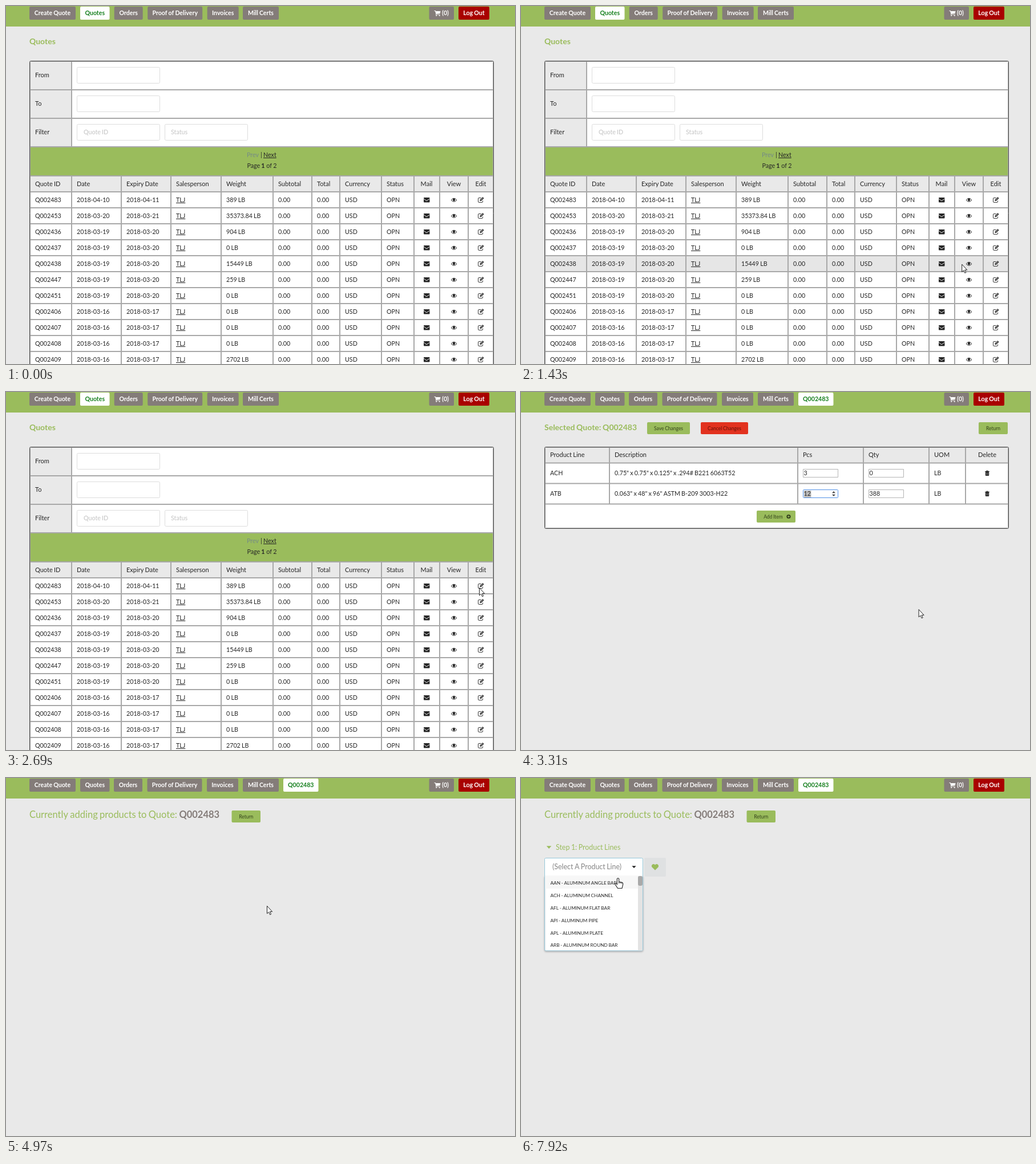
Recreate the animation shown at these times as an HTML page with a canvas. Size 892 px wide and 628 px high, loop 8 s.

```html
<!DOCTYPE html>
<html lang="en">
<head>
<meta charset="utf-8">
<title>Quotes</title>
<style>
  html, body { margin: 0; width: 100%; height: 100%; overflow: hidden; background: #e9e9e9; }
  canvas { display: block; }
</style>
</head>
<body>
<canvas id="stage" width="892" height="628"></canvas>
<script>
const ctx = document.getElementById('stage').getContext('2d');
const LOOP = 8000;
const INK = '#262626', GREEN = '#9abc5c', PALE = '#e9e9e9', GRAY = '#847c79', LINE = '#a8a8a8', HOVER = '#e6e6e6';

// Times at which the pages change
const PRESS_EDIT = 2510, EDIT_PAGE = 2810, PRESS_ADD = 4850, ADD_PAGE = 4970, STEP_SHOWN = 5030,
      MENU_OPEN = 7270, TO_MENU = 7720;

// Pointer path: time, x, y
const path = [
  [1110, 689, 616], [1250, 689, 616], [1340, 728, 543], [1430, 772, 453], [1600, 808, 388],
  [1800, 825, 353], [2040, 830, 345], [2270, 829, 343], [2810, 829, 343], [3000, 795, 354],
  [3310, 697, 381], [3370, 671, 380], [3600, 573, 331], [3850, 490, 262], [4160, 460, 227],
  [4330, 457, 224], [5550, 457, 224], [5700, 395, 224], [5900, 275, 216], [6100, 207, 192],
  [6310, 178.5, 165], [7720, 178.5, 165], [7920, 170, 176]
];

const quotes = [
  '483 04-10 04-11 389', '453 03-20 03-21 35373.84', '436 03-19 03-20 904', '437 03-19 03-20 0',
  '438 03-19 03-20 15449', '447 03-19 03-20 259', '451 03-19 03-20 0', '406 03-16 03-17 0',
  '407 03-16 03-17 0', '408 03-16 03-17 0', '409 03-16 03-17 2702'
].map(row => row.split(' '));
const quoteColumns = [42, 115, 202, 289, 377, 468, 536, 585, 658, 715, 760, 810];
const quoteHeads = ['Quote ID', 'Date', 'Expiry Date', 'Salesperson', 'Weight', 'Subtotal', 'Total',
                    'Currency', 'Status'];
const itemColumns = [42, 155, 485, 600, 715, 779];
const products = ['AAN - ALUMINUM ANGLE BAR', 'ACH - ALUMINUM CHANNEL', 'AFL - ALUMINUM FLAT BAR',
                  'API - ALUMINUM PIPE', 'APL - ALUMINUM PLATE', 'ARB - ALUMINUM ROUND BAR'];

function rect(x, y, w, h, fill) {
  ctx.fillStyle = fill;
  ctx.fillRect(x, y, w, h);
}

function box(x, y, w, h, radius, fill, stroke) {
  ctx.beginPath();
  ctx.roundRect(x, y, w, h, radius);
  if (fill) { ctx.fillStyle = fill; ctx.fill(); }
  if (stroke) { ctx.strokeStyle = stroke; ctx.lineWidth = 1; ctx.stroke(); }
}

// Draws text centred vertically on y and returns its right end
function text(s, x, y, { size = 10.7, color = INK, weight = 400, center = false, underline = false } = {}) {
  ctx.font = `${weight} ${size}px Lato, sans-serif`;
  ctx.wordSpacing = `${-0.05 * size}px`;
  const width = ctx.measureText(s).width;
  if (center) x -= width / 2;
  ctx.fillStyle = color;
  ctx.fillText(s, x, Math.round(y + size * 0.36));
  if (underline) rect(x, Math.round(y) + 5, width, 1, color);
  return x + width;
}

function shape(d, x, y, fill, stroke, width = 1) {
  const p = new Path2D(d);
  ctx.save();
  ctx.translate(x, y);
  if (fill) { ctx.fillStyle = fill; ctx.fill(p); }
  if (stroke) { ctx.strokeStyle = stroke; ctx.lineWidth = width; ctx.stroke(p); }
  ctx.restore();
}

const icons = {
  mail(x, y) {
    box(x - 5, y - 4, 10.5, 8.5, 1, INK);
    shape('M-5-1.8L0 1.8L5.5-1.8', x, y, null, '#fff', 0.9);
  },
  eye(x, y) {
    shape('M-5 .5Q0-6 5 .5Q0 6-5 .5Z', x, y, null, INK);
    shape('M-2.2 0a2.2 2.2 0 1 0 4.4 0a2.2 2.2 0 1 0-4.4 0', x, y, INK);
  },
  edit(x, y) {
    shape('M.5-3.5H-3Q-4.5-3.5-4.5-2V3Q-4.5 4.5-3 4.5H2Q3.5 4.5 3.5 3V1.5', x, y, null, INK, 0.9);
    shape('M-1.5 2V-.2L3.4-5L5.6-2.8L.7 2Z', x, y, INK);
    shape('M-.4 .6L3.8-3.4', x, y, null, '#fff', 0.8);
  },
  trash(x, y) {
    shape('M-4-3H4M-1.5-3V-4.3H1.5V-3', x, y, null, INK);
    box(x - 3.2, y - 2.5, 6.4, 7, 1, INK);
    shape('M-1.3-1V3M1.3-1V3', x, y, null, '#bbb', 0.7);
  },
  cart(x, y) {
    shape('M-5.5-4.5H-3.2L-2.8-3.4H5.5L4.7.7L-2 1.5V2.2H4.5V3.1H-3L-2.7 1.2L-3.9-3.5H-5.5Z', x, y, '#fff');
    shape('M-2.8 4.2a1 1 0 1 0 2 0a1 1 0 1 0-2 0M2.7 4.2a1 1 0 1 0 2 0a1 1 0 1 0-2 0', x, y, '#fff');
  },
  plus(x, y) {
    shape('M-3.6 0a3.6 3.6 0 1 0 7.2 0a3.6 3.6 0 1 0-7.2 0', x, y, '#33401c');
    shape('M-2 0H2M0-2V2', x, y, null, GREEN, 1.1);
  }
};

function smallButton(label, x, y, w, { fill = GREEN, color = '#35431c', shift = 0 } = {}) {
  box(x, y, w, 21, 2, fill);
  text(label, x + w / 2 + shift, y + 11, { size: 8.5, color, center: true });
}

function navigation(onList) {
  rect(0, 0, 892, 36, GREEN);
  const tabs = [['Create Quote', 41, 81], ['Quotes', 130, 51.5], ['Orders', 189, 50],
                ['Proof of Delivery', 247.5, 96], ['Invoices', 352, 55], ['Mill Certs', 415, 63]];
  if (!onList) tabs.push(['Q002483', 486, 61.5]);
  const active = onList ? 1 : 6;
  tabs.forEach(([label, x, w], i) => {
    if (onList && i > 1 && i < 5) x += 0.7;
    box(x, 1, w, 23, 2, i === active ? '#fff' : GRAY);
    text(label, x + w / 2, 12.5, { size: 10.6, weight: 700, center: true, color: i === active ? '#17801f' : '#fff' });
  });
  box(741.5, 1, 43.5, 23, 2, GRAY);
  icons.cart(756, 12.5);
  text('(0)', 764, 12.5, { size: 10.6, weight: 700, color: '#fff' });
  box(793, 1, 54, 23, 2, '#a90000');
  text('Log Out', 820, 12.5, { size: 10.6, weight: 700, color: '#fff', center: true });
}

function tableFrame(height) {
  box(42.5, 97.5, 811, height - 3, 1, null, LINE);
  box(41.5, 96.5, 813, height - 1, 2, null, '#4c4c4c');
}

const rowLine = y => rect(43, y - 1, 811, 2, LINE);
const columnLines = (columns, top, bottom) =>
  columns.slice(1).forEach(x => rect(x - 1, top, 2, bottom - top, LINE));

function listPage(time, pointer) {
  text('Quotes', 41, 61.5, { size: 14, weight: 700, color: GREEN });
  rect(42, 97, 812, 531, '#fff');
  rect(42, 97, 73, 150, PALE);
  ['From', 'To', 'Filter'].forEach((label, i) => {
    const y = 121.5 + i * 50;
    text(label, 51, y, { size: 11 });
    box(124.5, y - 14, 145, 28, 2, '#fff', '#dcdcdc');
    rowLine(147 + i * 50);
  });
  box(278.5, 207.5, 145, 28, 2, '#fff', '#dcdcdc');
  text('Quote ID', 136, 221.5, { color: '#c3c3c3' });
  text('Status', 289, 221.5, { color: '#c3c3c3' });
  rect(114, 97, 2, 150, LINE);

  rect(43, 248, 811, 49, GREEN);
  text('Prev', 422, 261, { color: '#758a86' });
  text('|', 446, 261);
  text('Next', 451, 261, { underline: true });
  const x = text('Page ', 422.5, 280);
  text(' of 2', text('1', x, 280, { weight: 700 }), 280);

  rect(43, 298, 811, 28, PALE);
  quoteHeads.forEach((label, i) => text(label, quoteColumns[i] + 9, 312, { size: 11 }));
  text('Mail', 737, 312, { size: 11, center: true });
  text('View', 785, 312, { size: 11, center: true });
  text('Edit', 832, 312, { size: 11, center: true });

  const hovered = time >= 1250 && time < PRESS_EDIT ? Math.floor((pointer.y - 326) / 28) : -1;
  quotes.forEach(([id, date, expiry, weight], i) => {
    const y = 340 + i * 28;
    if (i === hovered) rect(43, y - 13, 811, 26, HOVER);
    const cells = ['Q002' + id, '2018-' + date, '2018-' + expiry, 'TLJ', weight + ' LB', '0.00', '0.00', 'USD', 'OPN'];
    cells.forEach((cell, c) => text(cell, quoteColumns[c] + 9, y, { underline: c === 3 }));
    icons.mail(737, y);
    icons.eye(785, y);
    icons.edit(832, y);
    rowLine(y - 14);
  });
  rowLine(298);
  columnLines(quoteColumns, 298, 628);
  tableFrame(560);
}

function numberInput(x, y, value, focused) {
  box(x + 0.5, y - 7.5, 61, 14, focused ? 1 : 0, '#fff', focused ? '#4f8fe6' : '#b4b4b4');
  if (focused) {
    rect(x + 2, y - 6, 12.5, 12, '#bdbdbd');
    shape('M-3-1.2L0-4.4L3-1.2ZM-3 1.2L0 4.4L3 1.2Z', x + 54, y - 0.5, '#444');
  }
  text(value, x + 1.5, y - 0.5);
}

function editPage(time, pointer) {
  text('Selected Quote: Q002483', 41, 61.5, { size: 14, weight: 700, color: GREEN });
  smallButton('Save Changes', 221, 53, 75);
  smallButton('Cancel Changes', 315, 53, 83, { fill: '#e2321f', color: '#641008' });
  smallButton('Return', 802, 53, 51);

  rect(42, 97, 812, 142, '#fff');
  rect(43, 98, 811, 26, PALE);
  ['Product Line', 'Description', 'Pcs', 'Qty', 'UOM'].forEach((label, i) =>
    text(label, itemColumns[i] + 9, 110.5, { size: 11 }));
  text('Delete', 817, 110.5, { size: 11, center: true });
  [['ACH', '0.75" x 0.75" x 0.125" x .294# B221 6063T52', '3', '0'],
   ['ATB', '0.063" x 48" x 96" ASTM B-209 3003-H22', '12', '388']].forEach(([line, about, pieces, quantity], i) => {
    const y = 142.5 + i * 36;
    text(line, 51, y);
    text(about, 164, y);
    numberInput(494, y + 0.5, pieces, i === 1);
    numberInput(609, y + 0.5, quantity, false);
    text('LB', 724, y);
    icons.trash(817, y);
  });
  if (pointer.y > 197 && pointer.y < 239 && time < PRESS_ADD) rect(43, 198, 811, 41, HOVER);
  [124.5, 160.5, 196.5].forEach(rowLine);
  columnLines(itemColumns, 97, 196);
  smallButton('Add Item', 413, 208, 68, { shift: -5 });
  icons.plus(469, 218.5);
  tableFrame(144);
}

function productMenu(progress) {
  ctx.save();
  ctx.translate(0, 172);
  ctx.scale(1, progress);
  ctx.translate(0, -172);
  ctx.globalAlpha = progress;
  ctx.shadowColor = 'rgba(34,36,38,.25)';
  ctx.shadowBlur = 3;
  ctx.shadowOffsetY = 1.5;
  box(41.5, 172.5, 172, 130.5, [0, 0, 2, 2], '#fff', '#96c8da');
  ctx.shadowColor = 'transparent';
  rect(42, 172, 163, 22, '#f7f7f7');
  products.forEach((name, i) => text(name, 51.5, 184 + i * 21.9, { size: 8.25 }));
  rect(205, 172, 8, 130.5, '#e3e3e3');
  box(205, 172, 8, 17, 3, '#a9a9a9');
  ctx.restore();
}

function addPage(time) {
  const x = text('Currently adding products to Quote: ', 41, 64.5, { size: 16.5, color: GREEN });
  text('Q002483', x, 64.5, { size: 16.5, weight: 700, color: GRAY });
  smallButton('Return', 395.5, 57, 50.5);
  if (time < STEP_SHOWN) return;

  shape('M-4.3-2.2H4.3L0 2.4Z', 49, 121.5, GREEN);
  text('Step 1: Product Lines', 61, 122, { size: 12.4, color: GREEN });
  const open = Math.min(1, Math.max(0, (time - MENU_OPEN + 40) / 240));
  const isOpen = time >= MENU_OPEN;
  box(41.5, 140.5, 172, 32, isOpen ? [2, 2, 0, 0] : 2, '#fff', isOpen ? '#96c8da' : '#ababab');
  const dark = Math.min(1, Math.max(0, (time - TO_MENU) / 180));
  const shade = Math.round(190 - dark * 58);
  text('(Select A Product Line)', 55, 156, { size: 12.4, color: `rgb(${shade},${shade},${shade})` });
  shape('M-3.7-1.8H3.7L0 2Z', 198, 156, '#222');
  box(216, 140, 38, 33, 2, '#dfe1e2');
  shape('M0 5.8L-5.4.4C-7.8-2.6-3.5-7.6 0-3.4C3.5-7.6 7.8-2.6 5.4.4Z', 235, 156, GREEN);
  if (isOpen) productMenu(open);
}

function pointerAt(time) {
  const next = path.findIndex(p => p[0] > time);
  if (next === 0) return { x: 689, y: 700 };
  if (next < 0) return { x: path.at(-1)[1], y: path.at(-1)[2] };
  const [t0, x0, y0] = path[next - 1], [t1, x1, y1] = path[next];
  const k = (time - t0) / (t1 - t0);
  return { x: x0 + (x1 - x0) * k, y: y0 + (y1 - y0) * k };
}

function drawPointer(time, { x, y }) {
  const overEdit = time >= 2000 && time < PRESS_EDIT;
  const overAdd = time >= 4160 && time < PRESS_ADD;
  const overMenu = time > TO_MENU && y > 172;
  const overSelect = time > STEP_SHOWN && x < 190 && y < 173;
  if (overEdit || overAdd || overMenu) {
    shape('M-1.6.8Q0-1.4 1.6.8V6L7.5 7.4Q9 8 8.6 11L7 17.5H-.5L-5 10.5Q-5.4 8-3.2 9L-1.6 10.5Z',
          x, y, '#fff', '#222', 1.1);
    shape('M1.6 6V9M4 6.7V9M6.3 7.2V9.5', x, y, null, '#222', 0.9);
  } else if (overSelect) {
    shape('M-2.5-6.5H-.7L0-6L.7-6.5H2.5M0-6V6M-2.5 6.5H-.7L0 6L.7 6.5H2.5', x, y, null, '#111', 1.1);
  } else {
    shape('M.5.5V13.8L3.5 11.2L5.6 15.8L7.6 14.9L5.5 10.4H9.6Z', x, y, '#fff', '#222', 1);
  }
}

function draw(now) {
  const time = now % LOOP;
  const pointer = pointerAt(time);
  rect(0, 0, 892, 628, PALE);
  navigation(time < EDIT_PAGE);
  if (time < EDIT_PAGE) listPage(time, pointer);
  else if (time < ADD_PAGE) editPage(time, pointer);
  else addPage(time);
  drawPointer(time, pointer);
}

const start = performance.now();
(function tick() {
  draw(performance.now() - start);
  requestAnimationFrame(tick);
})();
</script>
</body>
</html>
```
